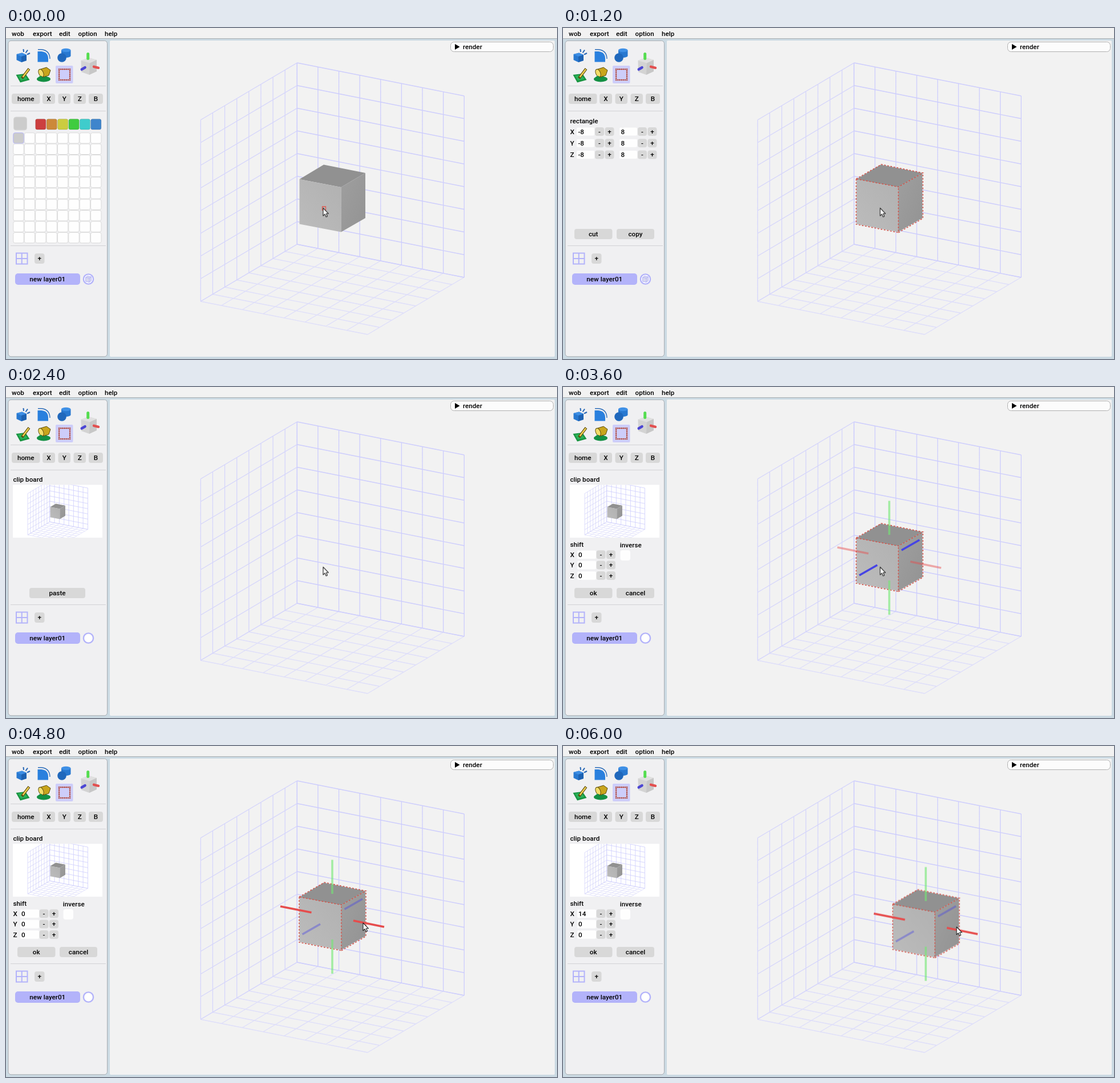
Write an HTML page that moves like this. It is 966 px wide and 580 px high and loops after 7200 ms.

```html
<!DOCTYPE html>
<html lang="en">
<head>
<meta charset="utf-8">
<title>Voxel editor</title>
<style>
  html, body { margin: 0; width: 100%; height: 100%; overflow: hidden; background: #cbdae3; }
  svg { display: block; width: 966px; height: 580px; }
  text { font: 500 11.7px Roboto, sans-serif; fill: #000; }
  .mid { text-anchor: middle; }
  .axis { fill: none; stroke-width: 3.6; }
</style>
</head>
<body>
<svg id="stage" viewBox="0 0 966 580"></svg>
<script>
const STEP = 1200, LOOP = 6 * STEP;
const LILAC = '#b3b3fa';

// Markup helpers
const label = (x, y, s, extra = '') => `<text x="${x}" y="${y}" ${extra}>${s}</text>`;
const box = (x, y, w, h, fill, r = 0, extra = '') =>
  `<rect x="${x}" y="${y}" width="${w}" height="${h}" rx="${r}" fill="${fill}" ${extra}/>`;
const path = (d, fill = 'none', extra = '') => `<path d="${d}" fill="${fill}" ${extra}/>`;
const line = (d, color, width = 1, extra = '') =>
  path(d, 'none', `stroke="${color}" stroke-width="${width}" ${extra}`);
const group = (id, body, extra = '') => `<g id="${id}" ${extra}>${body}</g>`;
const list = (n, make) => Array.from({ length: n }, (_, i) => make(i)).join('');
const button = (x, y, w, s, h = 18) =>
  box(x, y, w, h, '#d8d8d8', 4) + label(x + w / 2, y + h / 2 + 4.2, s, 'class="mid"');
const spinner = (x, y) => button(x, y - 7.5, 16, '-', 15) + button(x + 17.5, y - 7.5, 16, '+', 15);

// Eight by eight mesh spanned by two edge vectors
function mesh([x, y], [ux, uy], [vx, vy], color) {
  const d = list(9, i => {
    const k = i / 8;
    return `M${x + ux * k} ${y + uy * k}l${vx} ${vy}M${x + vx * k} ${y + vy * k}l${ux} ${uy}`;
  });
  return line(d, color, 1.3);
}

function room() {
  const left = [-169, 100], right = [293, 58], down = [0, 318];
  return mesh([510, 379], left, right, '#dedefa')
    + mesh([510.3, 61], left, down, '#d5d5fb')
    + mesh([510.3, 61], right, down, '#cdcdfd');
}

const cube = () =>
  path('M514.5 265L557 239.5L630 254L587.5 279Z', '#919191')
  + path('M514.5 265L587.5 279V357.5L514.5 343.5Z', 'url(#front)')
  + path('M587.5 279L630 254V333L587.5 357.5Z', 'url(#side)');

const outline = () => line(
  'M514 264.5L558 239L631 254L588 278.5ZV344L588 358.5V278.5M588 358.5L631 333.5V254',
  '#d2564c', 1.5, 'stroke-dasharray="3 2.6"');

function menuBar() {
  const items = [[10, 'wob'], [47, 'export'], [93, 'edit'], [126.5, 'option'], [173, 'help']];
  return box(0, 0, 966, 18, '#f2f2f2') + line('M0 18.5H966', '#a9aeb2')
    + items.map(([x, s]) => label(x, 13.5, s)).join('');
}

function toolIcons() {
  const dots = list(24, i => {
    const side = Math.floor(i / 6), k = (i % 6) * 3.15;
    const [x, y] = [[k, 0], [18.9, k], [18.9 - k, 18.9], [0, 18.9 - k]][side];
    return `<circle cx="${93.1 + x}" cy="${72.2 + y}" r="1.25" fill="#b0402c"/>`;
  });
  return path('M18.5 46L28 43.5L36 47V57L27 60L18.5 56Z', '#2878d0')
    + path('M18.5 46L28 43.5L36 47L27 50Z', '#3d8ee4') + path('M27 50L36 47V57L27 60Z', '#1e62b2')
    + line('M31 42L30.5 37M34.5 43.5L38 38.5M37 46.5L42 44', '#2464b4', 2)
    + path('M55.5 41H62Q74 42 74 54V59.5H55.5Z', '#2a80de')
    + line('M56 37.8H62Q76.5 39 77 54', '#2c6cb8', 1.4)
    + path('M97 39V49A8.3 3.3 0 0 0 113.5 49V39Z', '#2878d0')
    + '<ellipse cx="105.2" cy="39" rx="8.3" ry="3.2" fill="#3f90e6"/>'
    + '<circle cx="98" cy="52" r="7.8" fill="#2068bc"/>'
    + path('M17.5 82L34 80L41.5 91L25 95.5Z', '#189440')
    + path('M21 83.5L32.5 82L37.5 89.5L26 92Z', '#2bb35a')
    + line('M28 88L40.5 71.5', '#58480c', 4.6) + line('M29.5 86L40 72.3', '#f0d050', 2.6)
    + '<ellipse cx="66" cy="89.5" rx="12" ry="5" fill="#149044"/>'
    + path('M58 73L71 69L78 74L75 83L65 86Z', '#c9a51c', 'stroke="#5c4d0c"')
    + '<ellipse cx="61.5" cy="79" rx="4" ry="7.2" transform="rotate(-24 61.5 79)" fill="#f3dd68" stroke="#5c4d0c"/>'
    + path('M63 84Q56 83 56 91L62 92Z', '#149044')
    + box(87, 66, 30.5, 31, '#cdcdfa', 2) + dots
    + path('M131.5 57L145 52L159 56V76L146 82L132 77Z', '#d3d3d3')
    + path('M131.5 57L145 52L159 56L147 61.5Z', '#e0e0e0')
    + path('M147 61.5L159 56V76L146 82Z', '#c7c7c7')
    + line('M143.7 45.5V53.5', '#55dd50', 5, 'stroke-linecap="round"')
    + line('M154 67.8L162 69.8', '#e25050', 4.4, 'stroke-linecap="round"')
    + line('M132.8 72.5L138.5 69.2', '#4c46d4', 4.6, 'stroke-linecap="round"');
}

function palette() {
  const colors = ['#cc3f3f', '#cc893a', '#cccc40', '#3fcc3f', '#3fcccc', '#3f85cc'];
  const cells = list(80, i => {
    const first = i === 0;
    return box(12.8 + (i % 8) * 19.4, 183.7 + Math.floor(i / 8) * 19.4, 18.4, 18.4,
      first ? '#cccccc' : '#fefefe', 3, `stroke="${first ? LILAC : '#dadada'}"`);
  });
  return box(13.5, 156, 23, 23, '#cccccc', 4, 'stroke="#d8d8d8"')
    + colors.map((c, i) => box(51.7 + i * 19.4, 159.5, 18.2, 18.4, c, 3, 'stroke="#00000020"')).join('')
    + cells;
}

function rectanglePanel() {
  const rows = ['X', 'Y', 'Z'].map((axis, i) => {
    const y = 181.5 + i * 20.2;
    return label(12.5, y + 4.3, axis) + box(24, y - 7, 31, 14, '#fefefe', 2) + label(26.5, y + 4.3, '-8')
      + spinner(56, y) + box(99, y - 7, 31, 14, '#fefefe', 2) + label(101.5, y + 4.3, '8') + spinner(131, y);
  }).join('');
  return label(12.5, 167, 'rectangle') + rows + button(20, 352, 66.5, 'cut') + button(94, 352, 66, 'copy');
}

const clipboard = () => label(12.5, 165.5, 'clip board') + box(12, 171.5, 157, 92.5, '#ffffff')
  + `<g clip-path="url(#thumb)"><g transform="translate(-39.7 149.9) scale(.228)">
     <g class="thin">${room()}</g>${cube()}</g></g>`;

function shiftPanel() {
  const rows = ['X', 'Y', 'Z'].map((axis, i) => {
    const y = 293.7 + i * 18.4;
    const value = i ? label(27, y + 4.3, '0')
      : group('zero', label(27, y + 4.3, '0')) + group('moved', label(27, y + 4.3, '14'));
    return label(12.5, y + 4.3, axis) + box(25, y - 7.3, 33, 14.6, '#fefefe', 2) + value + spinner(58.5, y);
  }).join('');
  return label(12.5, 280, 'shift') + label(99.8, 280.5, 'inverse')
    + box(100.5, 286, 17.5, 18, '#fefefe', 4) + rows
    + button(20, 352, 66.5, 'ok') + button(94, 352, 66, 'cancel');
}

function sidebar() {
  const views = [[10, 49.5, 'home'], [64, 22, 'X'], [91.5, 21.5, 'Y'], [118.5, 21.5, 'Z'], [145, 25, 'B']];
  return box(4, 22.3, 173.5, 553.5, '#f0f0f2', 5, 'stroke="#a7abb0"') + toolIcons()
    + [101.5, 145.5, 381.5].map(y => line(`M8 ${y}H175`, '#d2d2d5')).join('')
    + views.map(([x, w, s]) => button(x, 115, w, s)).join('')
    + group('palette', palette()) + group('rectangle', rectanglePanel())
    + group('clipboard', clipboard()) + group('paste', button(41, 352, 98, 'paste'))
    + group('shift', shiftPanel())
    + line('M18 394.5H37.5V413.5H18ZM27.7 394.5V413.5M18 404H37.5', LILAC, 2)
    + button(50, 395, 17.5, '+') + box(16, 430, 114, 20, LILAC, 5)
    + label(72.8, 444.2, 'new layer01', 'class="mid"')
    + `<circle cx="144.5" cy="440" r="8.6" fill="#fff" stroke="${LILAC}" stroke-width="2.4"/>`
    + group('layerCube', path('M139.5 437L143 434.5L149.5 436V443L146 445.5L139.5 444Z', '#d9d9ee', `stroke="${LILAC}"`)
      + line('M139.5 437L146 438.2V445.5M146 438.2L149.5 436', LILAC));
}

const axes = () =>
  path('M572 199.5V259M572 339V399', 'none', 'class="axis" stroke="#72e872" stroke-opacity=".62"')
  + path('M481 281L535.5 291.8M609 306L663 317', 'none', 'id="xAxis" class="axis" stroke="#e64c4c"')
  + path('M519.5 330L551 312M593.5 286L625 268', 'none', 'id="zAxis" class="axis" stroke="#4644e4"');

const viewport = () => box(182, 22, 780, 554, '#f2f2f2', 2) + room()
  + box(779.5, 24.5, 180, 17, '#fcfcfc', 6, 'stroke="#b0b0b0"')
  + path('M787 28L795.5 33L787 38Z', '#000') + label(801, 37.2, 'render')
  + group('model', group('solid', cube()) + group('outline', outline()) + group('axes', axes()))
  + group('hover', line('M554.5 313H560.5V319H554.5Z', '#e05a50', 1.3))
  + group('cursor', path('M0 0V13.5L3.1 10.7L5.2 15.5L7.5 14.5L5.4 9.8H9.5Z', '#fff',
    'stroke="#222" stroke-width="1.1" stroke-linejoin="round"'));

const stage = document.getElementById('stage');
stage.innerHTML = `<defs>
  <linearGradient id="front" x1="0" y1="1" x2="1" y2="0">
    <stop stop-color="#bcbcbc"/><stop offset="1" stop-color="#b1b1b1"/></linearGradient>
  <linearGradient id="side" x1="0" y1="0" x2="1" y2="1">
    <stop stop-color="#9f9f9f"/><stop offset="1" stop-color="#939393"/></linearGradient>
  <clipPath id="thumb">${box(12, 171.5, 157, 92.5, '#fff')}</clipPath></defs>`
  + box(0, 0, 966, 580, '#cbdae3') + menuBar() + viewport() + sidebar();

stage.querySelectorAll('.thin path').forEach(p => p.setAttribute('stroke-width', 3.6));

// One value per step, held until the next step
function hold(id, property, values) {
  const frames = [...values, values[0]].map((v, i) => ({ [property]: v, offset: i / 6, easing: 'step-end' }));
  const motion = document.getElementById(id).animate(frames, { duration: LOOP, iterations: Infinity });
  motion.startTime = document.timeline.currentTime;
}

const shown = {
  palette: '100000', rectangle: '010000', clipboard: '001111', paste: '001000', shift: '000111',
  zero: '000110', moved: '000001', layerCube: '110000', solid: '110111', outline: '010111',
  axes: '000111', hover: '100000'
};
for (const [id, steps] of Object.entries(shown)) hold(id, 'opacity', [...steps].map(Number));

const rest = 'translate(0px, 0px)', start = 'translate(556px, 315.5px)';
hold('model', 'transform', [rest, rest, rest, rest, rest, 'translate(64px, 12.6px)']);
hold('cursor', 'transform', [start, start, start, start, 'translate(626px, 310px)', 'translate(690px, 317px)']);
hold('xAxis', 'strokeOpacity', [.45, .45, .45, .45, 1, 1]);
hold('zAxis', 'strokeOpacity', [1, 1, 1, 1, .4, .4]);
</script>
</body>
</html>
```
